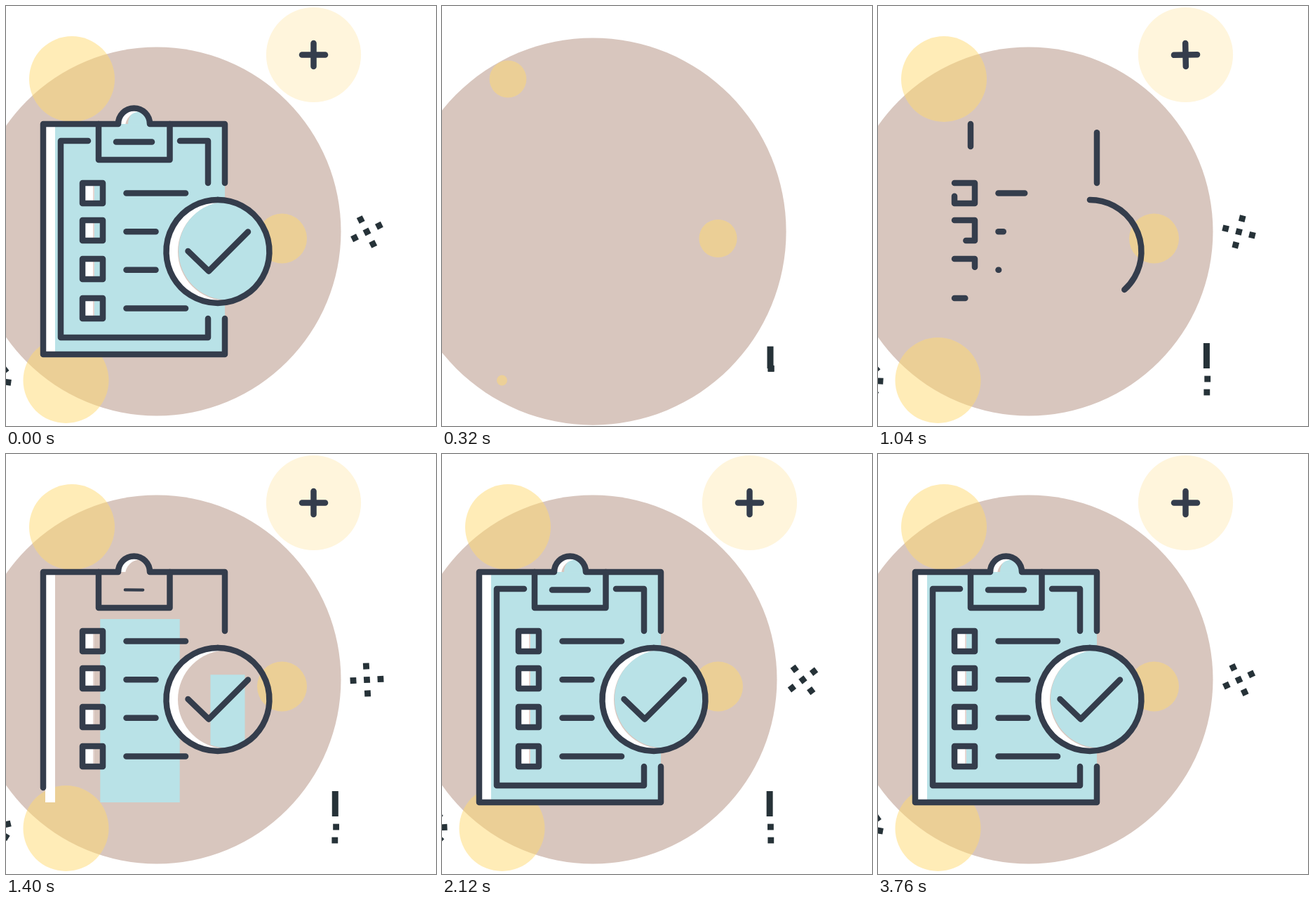
An HTML page with a canvas for the animation above (3800 ms loop, 613 by 598 pixels).

```html
<!DOCTYPE html>
<html>
<head>
<meta charset="utf-8">
<style>
html, body { margin: 0; width: 100%; height: 100%; overflow: hidden; background: #fff; }
canvas { display: block; }
</style>
</head>
<body>
<canvas id="stage" width="613" height="598"></canvas>
<script>
const ctx = document.getElementById('stage').getContext('2d');
const LOOP = 3800, TAU = Math.PI * 2;
const INK = '#343d4c', DARK = '#263238', TEAL = '#b9e2e7', BROWN = '#d8c6be';
const CREAM = '#fff5dc', YELLOW = 'rgba(255,218,113,.5)';
const BOX_TOPS = [252, 305, 360, 416];

const ease = u => (1 - Math.cos(Math.PI * Math.max(0, Math.min(1, u)))) / 2;
const span = (t, start, length) => ease((t - start) / length);
// Grow to 105 %, then settle at 100 %
const pop = (t, start) => 1.05 * span(t, start, 320) - 0.05 * span(t, start + 340, 180);

function line(d, start, duration) {
  const probe = document.createElementNS('http://www.w3.org/2000/svg', 'path');
  probe.setAttribute('d', d);
  return { path: new Path2D(d), length: probe.getTotalLength(), start, duration };
}

const lines = [
  line('M312 252V168H205A22.5 22.5 0 0 0 160 168H53V496H312V445', 900, 820),
  line('M132 168V219H233.5V168', 950, 350),
  line('M302 276A73.5 73.5 0 1 1 301.9 276', 850, 450),
  line('M259.5 349L289 377.5L345 321.5', 1080, 280),
  line('M117 192H78V472H288V445', 1420, 420),
  line('M248 192H288V252', 1420, 300),
  ...BOX_TOPS.flatMap((top, i) => [
    line(`M109 ${top}h29v29h-29z`, 820 + i * 50, 300),
    line(`M171.5 ${266.5 + i * 54.67}h${i % 3 ? 42 : 84.5}`, 920 + i * 50, 260)
  ])
];

function disc(x, y, r, color) {
  ctx.fillStyle = color;
  ctx.beginPath();
  ctx.arc(x, y, r, 0, TAU);
  ctx.fill();
}

function block(x, y, w, h, color) {
  ctx.fillStyle = color;
  ctx.fillRect(x, y, w, h);
}

const square = (x, y, size) => block(x - size / 2, y - size / 2, size, size, DARK);

function placed(x, y, scale, turns, draw) {
  if (scale <= 0) return;
  ctx.save();
  ctx.translate(x, y);
  ctx.rotate(turns * TAU);
  ctx.scale(scale, scale);
  draw();
  ctx.restore();
}

function clipped(shape, draw) {
  ctx.save();
  ctx.beginPath();
  shape();
  ctx.clip('evenodd');
  draw();
  ctx.restore();
}

// Box that widens from its centre and rises from its bottom
function wipe(x, y, w, h, wide, high, draw) {
  clipped(() => ctx.rect(x + w * (1 - wide) / 2, y + h * (1 - high), w * wide, h * high), draw);
}

// Rectangle with a round hole
function pierced(x, y, w, h, cx, cy, r, color) {
  clipped(() => {
    ctx.rect(x, y, w, h);
    ctx.moveTo(cx + r, cy);
    ctx.arc(cx, cy, r, 0, TAU);
  }, () => block(x, y, w, h, color));
}

function dash(half, turns = 0) {
  const x = half * Math.cos(turns * TAU), y = half * Math.sin(turns * TAU);
  ctx.beginPath();
  ctx.moveTo(-x, -y);
  ctx.lineTo(x, y);
  ctx.stroke();
}

function drawFills(t) {
  const white = span(t, 1050, 300), rise = span(t, 1200, 303);
  const knob = () => ctx.arc(182.5, 168.3, 21, Math.PI, TAU);
  const badge = () => ctx.arc(302, 349.5, 72, 0, TAU);

  wipe(70, 146, 242, 350, rise ** 2.58, rise, () => {
    pierced(70, 168, 242, 328, 302, 349.5, 73, TEAL);
    clipped(knob, () => disc(196, 168, 22, TEAL));
  });

  wipe(56, 168, 14, 328, 1, white, () => block(56, 168, 14, 328, '#fff'));
  for (const top of BOX_TOPS) wipe(112, top, 14, 29, 1, white, () => {
    block(112, top, 12, 29, '#fff');
    block(124, top, 2, 29, '#e6d6d2');
  });
  wipe(161, 146, 43, 22, 1, white, () =>
    clipped(knob, () => pierced(161, 146, 43, 23, 192, 172, 22, '#fff')));
  wipe(230, 277, 144, 145, 1, white, () =>
    clipped(badge, () => pierced(230, 277, 144, 145, 315, 349.5, 70, '#fff')));

  wipe(246, 278.5, 140, 140, rise ** 3.57, rise, () =>
    clipped(badge, () => disc(316, 348.5, 70, TEAL)));
}

function drawLines(t) {
  ctx.strokeStyle = INK;
  ctx.lineWidth = 8.5;
  ctx.lineCap = ctx.lineJoin = 'round';
  for (const { path, length, start, duration } of lines) {
    const p = span(t, start, duration);
    if (!p) continue;
    ctx.setLineDash(p < 1 ? [length * p, length * 2] : []);
    ctx.stroke(path);
  }
  ctx.setLineDash([]);

  const bar = pop(t, 1246), plus = pop(t, 550);
  placed(182.5, 193.5, bar, 1 - bar, () => dash(25.5));
  placed(438.5, 69.5, plus, 1 - plus, () => {
    dash(16.5);
    dash(16.5, 1 / 4);
  });
}

function drawExclamation(t) {
  const shown = span(t, 160, 210) * (1 - span(t, 3300, 340));
  const sway = -1.1 * Math.cos(TAU * (t - 640) / 1430);
  const drop = 19 * span(t, 240, 240) * shown;
  const size = 8.8 * Math.min(1, shown * 1.3);
  block(463.7 + sway, 516 - 36 * shown, 9, 36 * shown, DARK);
  square(469.5 + sway, 512 + drop, size);
  square(468.8, 512 + drop + 19 * span(t, 640, 300) * shown, size);
}

function drawSpinners(t) {
  const scale = pop(t, 373), turns = -t / LOOP / 2;
  placed(514.5, 321.5, scale, 0.176 + turns, () => {
    square(0, 0, 8.8);
    for (let i = 0; i < 4; i++) {
      square(19.5, 0, 8.8);
      ctx.rotate(TAU / 4);
    }
  });
  placed(-20.5, 532.5, scale, 0.147 + turns, () => {
    for (let i = 0; i < 8; i++) {
      block(14, -4.4, 14, 8.8, DARK);
      ctx.rotate(TAU / 8);
    }
  });
}

function draw(t) {
  block(0, 0, 613, 598, '#fff');
  disc(215, 321, 262.5 * pop(t, 0), BROWN);
  disc(393.5, 331, 35.5 * pop(t, 113), YELLOW);
  disc(94, 104, 61 * pop(t, 179), YELLOW);
  disc(85.5, 533, 61 * pop(t, 250), YELLOW);
  disc(438.5, 69.5, 67.6 * pop(t, 431), CREAM);
  drawSpinners(t);
  drawExclamation(t);
  drawFills(t);
  drawLines(t);
}

function tick() {
  const t = performance.now() % LOOP;
  // The finished picture holds briefly before everything restarts
  draw(t < 40 ? LOOP + t : t);
  requestAnimationFrame(tick);
}
tick();
</script>
</body>
</html>
```
